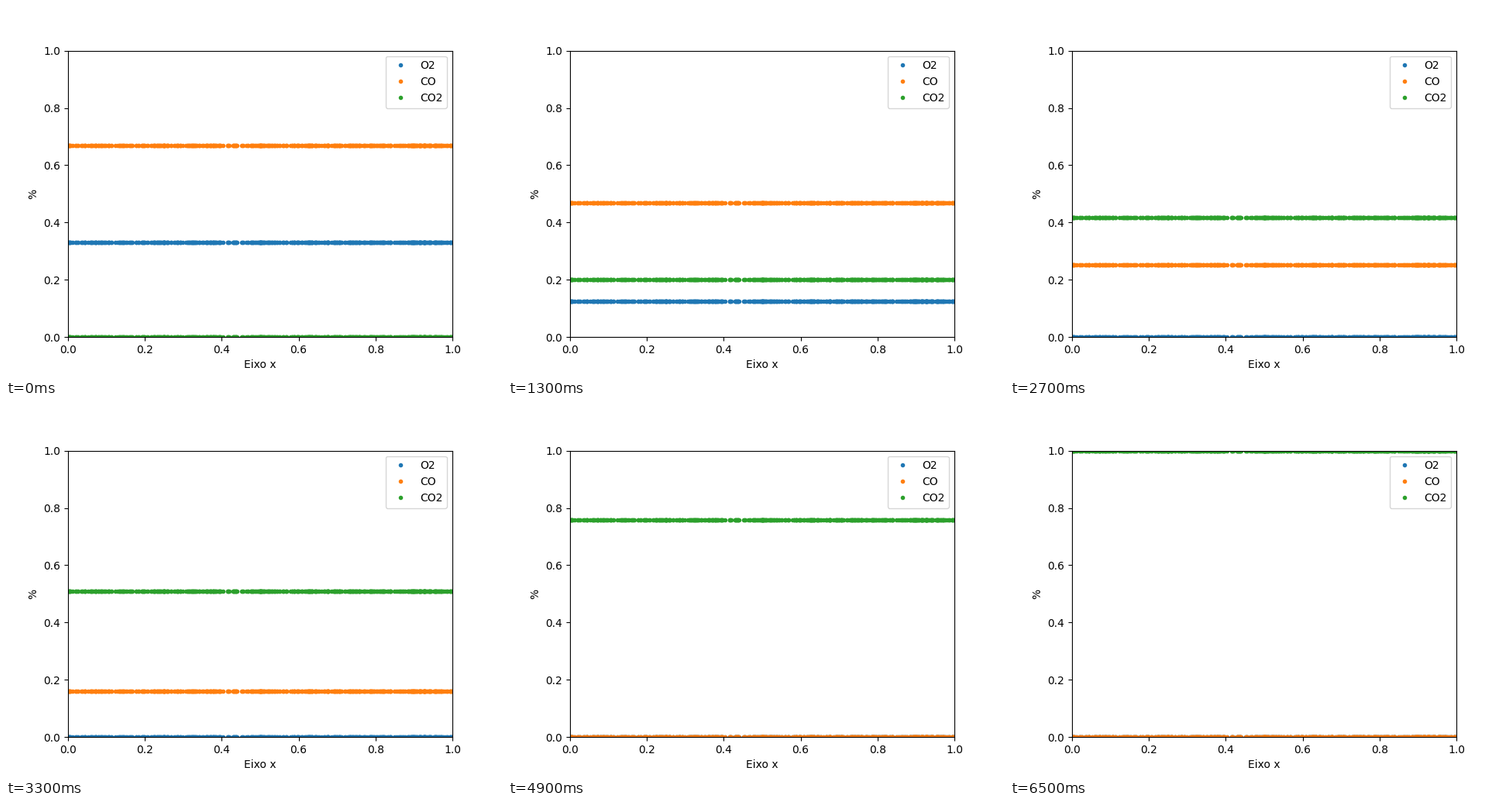
Animation, 640 px wide and 480 px high, one loop 10 s. Source, as a matplotlib script:

```python
import numpy as np
import matplotlib.pyplot as plt
from matplotlib.animation import FuncAnimation

FRAMES = 100
INTERVAL = 100  # ms

# label, starting fraction, change per frame
GASES = [
    ("O2", 0.33, -0.0157),
    ("CO", 0.67, -0.01547),
    ("CO2", 0.0, 0.01547),
]

# Stretches of the x axis without samples
GAPS = [(0.1665, 0.1775), (0.397, 0.404), (0.455, 0.463), (0.468, 0.476)]


def sample_positions(count=500, seed=4):
    x = np.random.default_rng(seed).random(count)
    for low, high in GAPS:
        x = x[(x < low) | (x > high)]
    edges = np.ravel(GAPS)
    return np.concatenate([x, edges, [0.001, 0.999]])


def fraction(start, rate, frame):
    return min(max(start + rate * frame, 0.0), 1.0)


plt.rcParams["font.family"] = "DejaVu Sans"
fig, ax = plt.subplots(figsize=(6.4, 4.8), dpi=100)
ax.set(xlim=(0, 1), ylim=(0, 1), xlabel="Eixo x", ylabel="%")

xs = sample_positions()
lines = [
    ax.plot(xs, np.full_like(xs, start), ".", label=label)[0]
    for label, start, _ in GASES
]
ax.legend(loc="upper right")


def update(frame):
    for line, (_, start, rate) in zip(lines, GASES):
        line.set_ydata(np.full_like(xs, fraction(start, rate, frame)))
    return lines


anim = FuncAnimation(fig, update, frames=FRAMES, interval=INTERVAL,
                     repeat=True, repeat_delay=0, blit=False)
plt.show()
```
